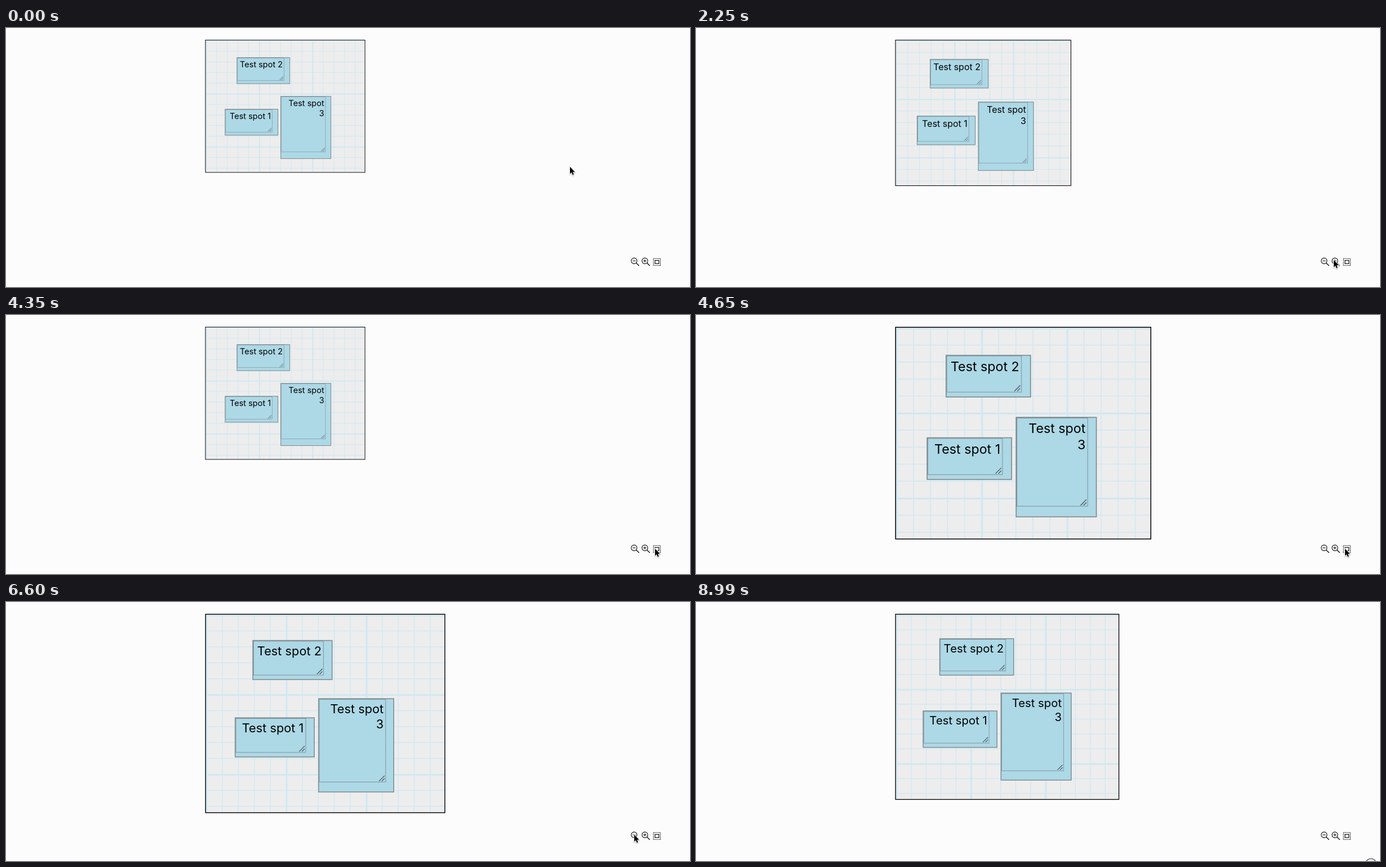
Recreate the animation shown at these times as an HTML page with a canvas. Size 1214 by 461 pixels, loop 9.01 s.

```html
<!DOCTYPE html>
<html lang="en">
<head>
<meta charset="utf-8">
<title>Zoomable board</title>
<style>
  html, body { margin: 0; width: 100%; height: 100%; overflow: hidden; background: #fcfcfc; }
  canvas { display: block; }
</style>
</head>
<body>
<canvas id="stage" width="1214" height="461"></canvas>
<script>
const ctx = document.getElementById('stage').getContext('2d');
const LOOP = 9010;
const STEP = 150;
const BASE = 0.946;
const BOARD = { x: 353.5, y: 21, w: 300.3, h: 250 };

const spots = [
  { x: 59.2, y: 33, w: 100, h: 50, lines: ['Test spot 2'] },
  { x: 37, y: 130, w: 100, h: 50, lines: ['Test spot 1'] },
  { x: 141.4, y: 106, w: 95, h: 118, lines: ['Test spot', '3'] }
];

const clicks = [
  { at: 2250, zoom: 1.1 },
  { at: 3600, zoom: 1 },
  { at: 4650, zoom: 1.6 },
  { at: 6450, zoom: 1.5 },
  { at: 6750, zoom: 1.4 }
];

const home = { x: 1001, y: 247 };
const moves = [
  { from: 450, to: 900, x: 738, y: 187 },
  { from: 900, to: 1650, x: 1132, y: 413 },
  { from: 2550, to: 3150, x: 1108, y: 412 },
  { from: 3600, to: 4350, x: 1152, y: 416 },
  { from: 5250, to: 5550, x: 1147, y: 438 },
  { from: 5700, to: 6000, x: 1115, y: 414 },
  { from: 7200, to: 7500, x: 1121, y: 436 },
  { from: 7800, to: 8700, x: 1217, y: 463 }
];

function zoomAt(t) {
  return clicks.reduce((zoom, c) => t >= c.at ? c.zoom : zoom, 1);
}

// The pointer is only seen at every STEP along its eased path.
function pointerAt(t) {
  const seen = Math.floor(t / STEP) * STEP;
  let { x, y } = home;
  for (const m of moves) {
    const p = Math.min(1, Math.max(0, (seen - m.from) / (m.to - m.from)));
    const eased = p * p * (3 - 2 * p);
    x += (m.x - x) * eased;
    y += (m.y - y) * eased;
  }
  return [x, y];
}

function path(points, closed) {
  ctx.beginPath();
  points.forEach(([x, y]) => ctx.lineTo(x, y));
  if (closed) ctx.closePath();
}

function frame(x, y, w, h, line, color) {
  ctx.lineWidth = line;
  ctx.strokeStyle = color;
  ctx.strokeRect(x + line / 2, y + line / 2, w - line, h - line);
}

function circle(x, y, r) {
  ctx.beginPath();
  ctx.arc(x, y, r, 0, 2 * Math.PI);
}

function drawGrid(step, thickness) {
  for (let p = 1; p < BOARD.w; p += step) {
    ctx.fillRect(p, 1, thickness, BOARD.h - 2);
    if (p < BOARD.h) ctx.fillRect(1, p, BOARD.w - 2, thickness);
  }
}

function drawSpot({ x, y, w, h, lines }) {
  ctx.save();
  ctx.translate(x, y);
  ctx.fillStyle = '#add8e6';
  ctx.fillRect(0, 0, w, h);
  frame(0, 0, w, h, 1, '#7f8588');

  const fieldW = (w - 2) * 0.9, fieldH = (h - 2) * 0.9;
  const right = 1 + fieldW, bottom = 1 + fieldH;
  frame(1, 1, fieldW, fieldH, 0.75, '#8599a1');

  ctx.fillStyle = '#000';
  lines.forEach((line, i) => ctx.fillText(line, right - 2.9, 19 + i * 19.1));

  ctx.strokeStyle = '#3f4a4f';
  ctx.lineWidth = 0.8;
  for (const size of [6.8, 3.4]) {
    path([[right - 1.8 - size, bottom - 1.5], [right - 1.8, bottom - 1.5 - size]]);
    ctx.stroke();
  }
  ctx.restore();
}

function drawBoard(zoom) {
  ctx.save();
  ctx.translate(BOARD.x, BOARD.y);
  ctx.scale(BASE * zoom, BASE * zoom);
  ctx.fillStyle = '#ededed';
  ctx.fillRect(0, 0, BOARD.w, BOARD.h);
  ctx.fillStyle = '#d0e8f2';
  drawGrid(20, 1);
  drawGrid(100, 2);
  frame(0, 0, BOARD.w, BOARD.h, 1, '#000');
  ctx.font = '15.35px Inter, sans-serif';
  ctx.textAlign = 'right';
  spots.forEach(drawSpot);
  ctx.restore();
}

function drawLens(x, plus) {
  const y = 414.5;
  ctx.strokeStyle = '#111';
  ctx.lineWidth = 1.1;
  circle(x, y, 5.1);
  ctx.moveTo(x - 2.7, y);
  ctx.lineTo(x + 2.7, y);
  if (plus) {
    ctx.moveTo(x, y - 2.7);
    ctx.lineTo(x, y + 2.7);
  }
  ctx.stroke();
  ctx.lineWidth = 1.4;
  path([[x + 3.7, y + 3.7], [x + 8.8, y + 8.7]]);
  ctx.stroke();
}

function drawTools(selected) {
  if (selected) {
    ctx.fillStyle = '#b3d7ff';
    ctx.fillRect(1124.3, 409, 4, 18);
    ctx.fillRect(1144, 409, 3.7, 18);
  }
  drawLens(1114.8, false);
  drawLens(1133.9, true);
  ctx.setLineDash([1.3, 1.3]);
  frame(1148.5, 409.7, 13.6, 13.6, 1.3, '#000');
  ctx.setLineDash([]);
  frame(1151.3, 413, 8, 7, 1.2, '#111');
}

function drawPointer(x, y) {
  ctx.save();
  ctx.translate(x, y);
  path([[0, 0], [0, 12.6], [2.8, 10], [4.8, 14.6], [6.8, 13.7], [4.9, 9.3], [8.8, 9.3]], true);
  ctx.shadowColor = 'rgba(0,0,0,.35)';
  ctx.shadowBlur = 2;
  ctx.shadowOffsetY = 1;
  ctx.lineWidth = 1.6;
  ctx.strokeStyle = '#fff';
  ctx.stroke();
  ctx.shadowColor = 'transparent';
  ctx.fillStyle = '#000';
  ctx.fill();
  ctx.restore();
}

function render(t) {
  ctx.fillStyle = '#fcfcfc';
  ctx.fillRect(0, 0, 1214, 461);
  drawBoard(zoomAt(t));
  drawTools(t >= 6750 && t < 8100);
  drawPointer(...pointerAt(t));
  if (t >= 8990) {
    ctx.strokeStyle = '#222';
    ctx.lineWidth = 1.1;
    circle(1198, 466, 9.3);
    ctx.stroke();
  }
}

const start = performance.now();
function tick() {
  render((performance.now() - start) % LOOP);
  requestAnimationFrame(tick);
}
tick();
</script>
</body>
</html>
```
